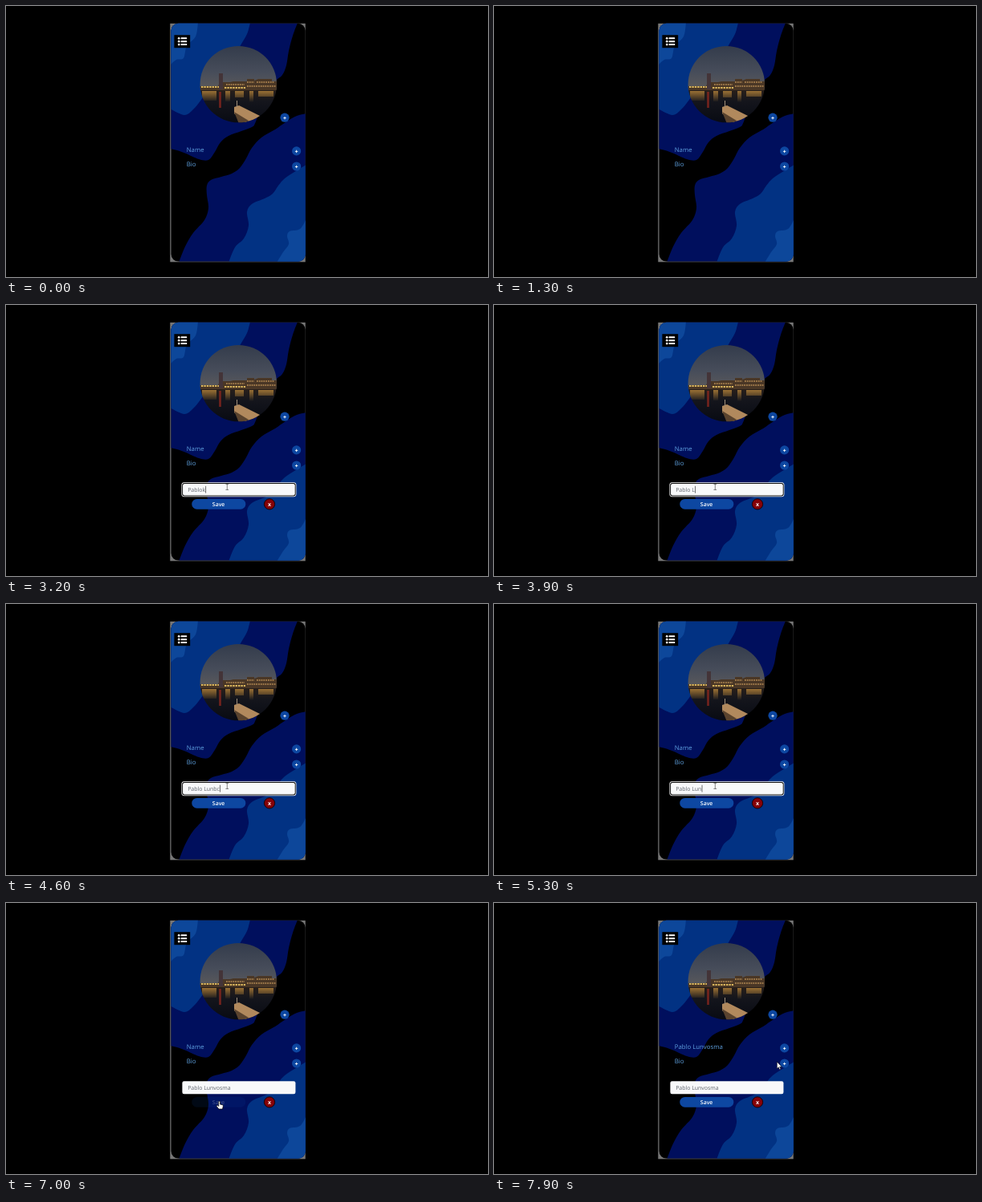
Animation of 600x338 px, one loop 8000 ms. Source, as an HTML page:

```html
<!DOCTYPE html>
<html lang="en">
<head>
<meta charset="utf-8">
<title>Profile editor</title>
<style>
  html, body { margin: 0; width: 100%; height: 100%; overflow: hidden; background: #000; }
  svg { display: block; width: 100vw; height: 100vh; }
  text { font-family: "Open Sans", "Noto Sans", sans-serif; white-space: pre; text-rendering: geometricPrecision; }
  .label { font-size: 7.8px; fill: #5fa1e0; }
  .typed { font-size: 6.95px; fill: #5d636a; }
  .button { font-size: 6.9px; font-weight: 600; fill: #fff; text-anchor: middle; }
  .add { fill: #0d47a1; }
  .plus { stroke: #fff; stroke-width: .9; }
  .navy { fill: #000f5d; }
  .blue { fill: #023283; }
  .light { fill: #0d479a; }
  .pointer > * { stroke-linejoin: round; stroke-linecap: round; }
</style>
</head>
<body>
<svg viewBox="0 0 600 338">
  <defs>
    <clipPath id="screen"><rect x="205.5" y="21.8" width="167.2" height="296.8" rx="9"/></clipPath>
    <clipPath id="round"><circle cx="289.3" cy="97.6" r="47.7"/></clipPath>
    <linearGradient id="sky" x1="0" y1="0" x2="0" y2="1">
      <stop offset="0" stop-color="#333b4b"/>
      <stop offset=".6" stop-color="#474d5a"/>
      <stop offset="1" stop-color="#5c5a5b"/>
    </linearGradient>
    <linearGradient id="water" x1="0" y1="0" x2="0" y2="1">
      <stop offset="0" stop-color="#2a201a"/>
      <stop offset=".35" stop-color="#14151c"/>
      <stop offset="1" stop-color="#080a12"/>
    </linearGradient>
    <linearGradient id="glow" x1="0" y1="0" x2="0" y2="1">
      <stop offset="0" stop-color="#c9923f" stop-opacity=".7"/>
      <stop offset="1" stop-color="#c9923f" stop-opacity="0"/>
    </linearGradient>
    <g id="add"><circle class="add" r="5.6"/><path class="plus" d="M-1.7 .5H1.7M0-1.2V2.2"/></g>
  </defs>

  <rect x="204.3" y="21.8" width="168.4" height="297.5" fill="#777"/>
  <rect x="205.5" y="21.8" width="167.2" height="296.8" rx="9"/>
  <g id="waves" clip-path="url(#screen)"></g>

  <rect x="209.4" y="36.2" width="19.8" height="16"/>
  <g id="menu" fill="#fff"></g>

  <g clip-path="url(#round)">
    <rect x="241" y="49" width="97" height="56" fill="url(#sky)"/>
    <rect x="241" y="104" width="97" height="43" fill="url(#water)"/>
    <path d="M241 105V100H264L266 95H279L283 94H300V91H309V93L314 91H331V94H338V105Z" fill="#4a3726"/>
    <path d="M265 84H270V104H265Z" fill="#433438"/>
    <path d="M243 101H265M272 102H298" stroke="#d9b55c" stroke-width="2" stroke-dasharray="2.4 1"/>
    <path d="M274 98H297M300 95H309M312 95H334M300 100H336" stroke="#b98d55" stroke-width="1.5" stroke-dasharray="1.8 1"/>
    <path d="M244 106H262V118H244ZM273 106H279V119H273ZM285 106H296V114H285ZM303 106H308V120H303ZM314 106H333V113H314Z" fill="url(#glow)"/>
    <path d="M266.5 107V127" stroke="#8e281f" stroke-width="2.6" opacity=".8"/>
    <path d="M284 126L290 124L317 137.5L310 147H300L284 134Z" fill="#b1895d"/>
    <path d="M284 132L302 143V147H290Z" fill="#5a432e"/>
    <path d="M287.5 118V126" stroke="#a3907a" stroke-width="1"/>
  </g>

  <use href="#add" x="347" y="139.2"/>
  <use href="#add" x="361.6" y="180.9"/>
  <use href="#add" x="361.6" y="200"/>
  <text class="label" id="name" x="224.7" y="181.6"></text>
  <text class="label" x="224.7" y="200.2">Bio</text>

  <g id="form">
    <g id="ring">
      <rect x="218.4" y="221.2" width="143" height="18" rx="3.4" fill="#fff"/>
      <rect x="219.1" y="221.9" width="141.6" height="16.6" rx="2.9" fill="#101010"/>
    </g>
    <rect id="field" rx="2.3" fill="#f8f9fa"/>
    <text class="typed" id="typed" x="226.2" y="232.9"></text>
    <rect id="caret" y="225.8" width=".7" height="8.8" fill="#333"/>
    <rect id="save" x="231.3" y="242" width="67" height="12.7" rx="6.3" fill="#0d47a1"/>
    <text class="button" id="saveText" x="264.6" y="251">Save</text>
    <circle cx="328" cy="248.4" r="6.6" fill="#860208" stroke="#150000" stroke-width=".9"/>
    <text class="button" x="328" y="250.7" style="font-weight:700">x</text>
  </g>

  <g id="hand" class="pointer">
    <path d="M-.9 .8Q0-.8 .9 .8V4L4 4.8Q5 5.2 4.8 6.6L4 10H-.6L-3.4 6.4Q-3.6 5-2.2 5.2L-.9 6.2Z" fill="#fff" stroke="#000" stroke-width=".7"/>
  </g>
  <g id="beam" class="pointer">
    <path d="M-1.5-3.4H1.5M0-3.4V3.4M-1.5 3.4H1.5" fill="none" stroke="#555" stroke-width=".7"/>
  </g>
  <g id="arrow" class="pointer">
    <path d="M0 0V8.2L1.9 6.5L3.2 9.4L4.6 8.8L3.3 6H5.8Z" fill="#fff" stroke="#000" stroke-width=".5"/>
  </g>
</svg>
<script>
const $ = id => document.getElementById(id);
const NS = "http://www.w3.org/2000/svg";
const LOOP = 8000;
const NAME = "Pablo Lunvosma";

function add(parent, tag, attrs) {
  const el = document.createElementNS(NS, tag);
  for (const key in attrs) el.setAttribute(key, attrs[key]);
  parent.appendChild(el);
}

// Smooth edge through the points, closed at a corner of the screen
function wave(color, corner, edge) {
  const p = edge.split(" ").map(s => s.split(",").map(Number));
  let d = "M" + p[0];
  for (let i = 0; i < p.length - 1; i++) {
    const a = p[i - 1] || p[i], b = p[i], c = p[i + 1], e = p[i + 2] || c;
    d += "C" + [0, 1].map(k => b[k] + (c[k] - a[k]) / 6) +
      " " + [0, 1].map(k => c[k] - (e[k] - b[k]) / 6) + " " + c;
  }
  add($("waves"), "path", { class: color, d: d + "L" + corner + "Z" });
}
const topLeft = "204,21", bottomRight = "374,320";
wave("navy", topLeft, "363,21 357,37 352,56 349,74 344,86 336,93 324,108 311,144 306,151 293,156 277,162 267,170 260,182 252,192 240,191 224,184 213,180 204,178");
wave("blue", topLeft, "304,21 300,35 292,49 280,70 256,98 243,117 233,129 222,136 204,128");
wave("light", topLeft, "239,21 236,38 225,50 221,65 212,67 204,74");
wave("navy", bottomRight, "374,134 362,137 348,145 335,154 318,164 306,177 299,190 291,202 281,209 268,213 255,217 250,224 250,236 252,252 247,267 233,283 223,300 215,320");
wave("blue", bottomRight, "374,198 359,207 347,215 339,224 332,234 322,240 306,247 300,257 302,274 296,290 285,301 277,320");
wave("light", bottomRight, "374,265 366,278 353,281 350,287 352,297 345,307 337,320");

for (const y of [40.3, 44.2, 48.1]) {
  add($("menu"), "circle", { cx: 215.2, cy: y, r: 1.35 });
  add($("menu"), "rect", { x: 217.6, y: y - 1, width: 7.6, height: 2, rx: .5 });
}

// "<" deletes the last character
const keys = "Pablok< Lunbc<<vosma";
const keyTimes = [2350, 2500, 2650, 2800, 2920, 3080, 3400, 3600, 3800, 3980,
  4180, 4400, 4540, 5000, 5200, 5500, 5720, 6050, 6220, 6400];

// time, x, y, pointer shown from then on
const moves = [
  [0, 361.5, 181, ""],
  [1400, 361.5, 181, "hand"],
  [1750, 361.5, 181, "arrow"],
  [1950, 290, 222, "beam"],
  [2100, 275.3, 227, "beam"],
  [6500, 275.3, 227, "beam"],
  [6650, 270, 238, "arrow"],
  [6750, 265.5, 247, "hand"],
  [7250, 265.5, 247, "hand"],
  [7400, 285, 240, "arrow"],
  [7750, 352.3, 198.3, "arrow"],
  [LOOP, 352.3, 198.3, "arrow"]
];

const show = (id, on) => { $(id).style.display = on ? "" : "none"; };

function placePointer(t) {
  const i = moves.findIndex((m, n) => n && t < m[0]);
  const [t0, x0, y0, kind] = moves[i - 1], [t1, x1, y1] = moves[i];
  const u = (t - t0) / (t1 - t0);
  for (const id of ["hand", "beam", "arrow"]) show(id, id === kind);
  if (kind) $(kind).setAttribute("transform", `translate(${x0 + (x1 - x0) * u} ${y0 + (y1 - y0) * u})`);
}

function placeField(focused) {
  const inset = focused ? .7 : 0;
  const box = { x: 219.4 + inset, y: 222.2 + inset, width: 141 - 2 * inset, height: 16 - 2 * inset };
  for (const key in box) $("field").setAttribute(key, box[key]);
  show("ring", focused);
}

function draw() {
  const t = performance.now() % LOOP;
  let text = "", last = 2100;
  keyTimes.forEach((at, i) => {
    if (t < at) return;
    text = keys[i] === "<" ? text.slice(0, -1) : text + keys[i];
    last = at;
  });
  const focused = t >= 2100 && t < 6850;
  show("form", t >= 1600);
  placeField(focused);
  $("typed").textContent = text;
  show("caret", focused && (t - last) % 1000 < 500);
  if (focused) $("caret").setAttribute("x", 226.5 + $("typed").getComputedTextLength());

  const pressed = t >= 6850 && t < 7300;
  $("save").style.opacity = pressed ? .13 : 1;
  $("saveText").style.opacity = pressed ? .22 : 1;
  $("name").textContent = t < 7300 ? "Name" : NAME;
  placePointer(t);
  requestAnimationFrame(draw);
}
draw();
</script>
</body>
</html>
```
